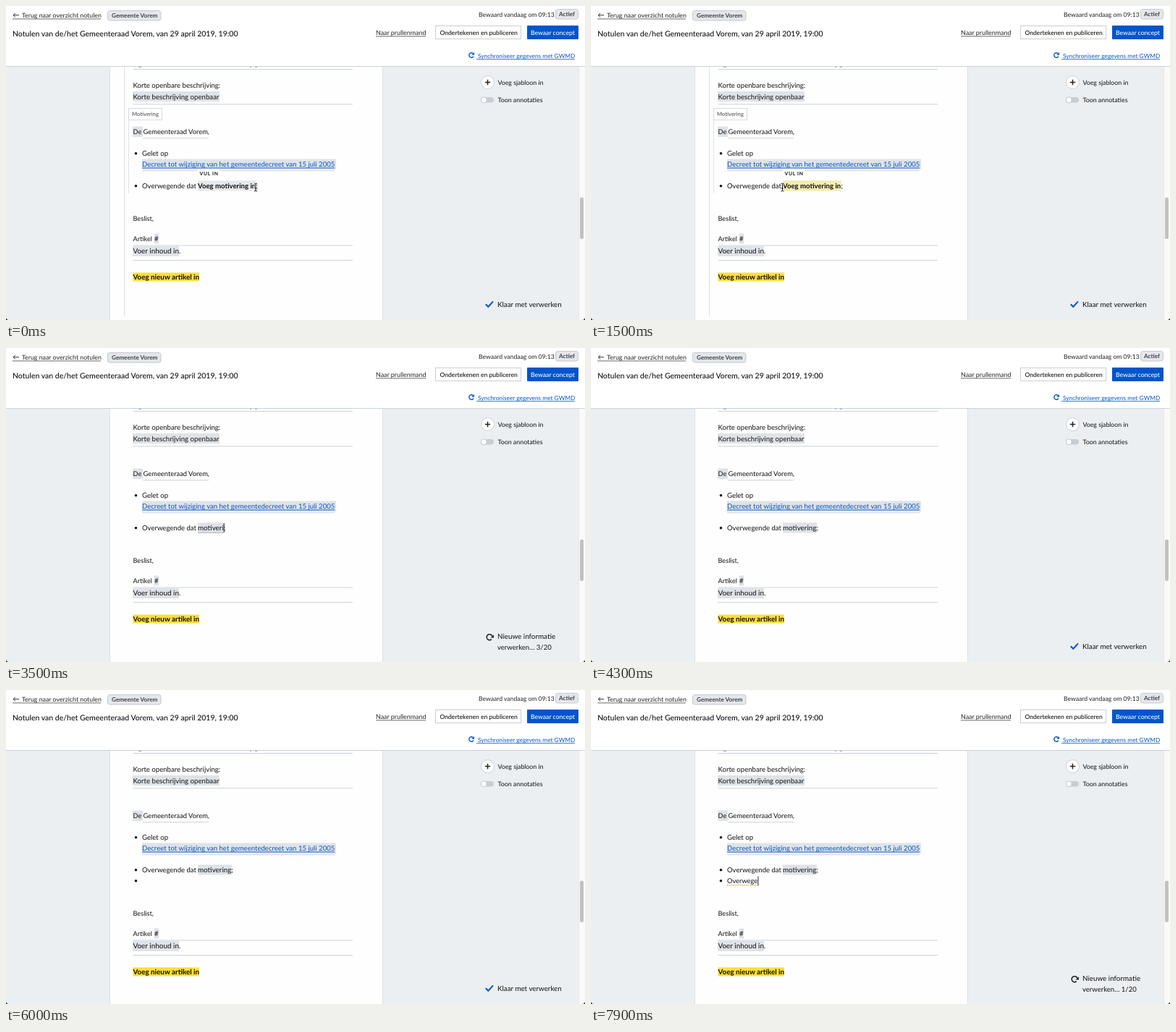
These frames come from a looping animation (800 px wide and 434 px high, 8 s). An HTML page:

```html
<!DOCTYPE html>
<html lang="nl">
<head>
<meta charset="utf-8">
<title>Notulen</title>
<style>
  html, body { margin: 0; width: 100%; height: 100%; overflow: hidden; background: #fff; }
  svg { display: block; width: 800px; height: 434px; fill: #111; }
  text { font-family: Lato, "Open Sans", sans-serif; text-rendering: geometricPrecision; white-space: pre; }
</style>
</head>
<body>
<svg id="stage" viewBox="0 0 800 434" xmlns="http://www.w3.org/2000/svg"></svg>
<script>
const LOOP = 8000;
const BLUE = '#0055cc', GREY = '#dfe3e8', LINE = '#cbd2d9';
const stage = document.getElementById('stage');

function add(parent, tag, attrs, content) {
  const el = document.createElementNS('http://www.w3.org/2000/svg', tag);
  for (const k in attrs) el.setAttribute(k, attrs[k]);
  if (content !== undefined) el.textContent = content;
  parent.appendChild(el);
  return el;
}
const group = parent => add(parent, 'g', {});
const rect = (p, x, y, width, height, fill, more) => add(p, 'rect', { x, y, width, height, fill, ...more });
const path = (p, d, stroke, width, more) =>
  add(p, 'path', { d, stroke, 'stroke-width': width, fill: 'none', ...more });
const label = (p, x, y, size, str, more) => add(p, 'text', { x, y, 'font-size': size, ...more }, str);
const dot = (p, y) => add(p, 'circle', { cx: 179.5, cy: y, r: 1.8 });
const show = (el, on) => el.setAttribute('display', on ? 'inline' : 'none');
const medium = { 'font-weight': 500 }, bold = { 'font-weight': 700 };

// Background and sheet
rect(stage, 0, 84, 800, 350, '#eceff2');
rect(stage, 143, 84, 378, 350, '#dde1e6');
rect(stage, 144, 84, 376, 350, '#fefefe');
rect(stage, 791, 84, 9, 350, '#fafafa');
path(stage, 'M791.5 84V434', '#e6e6e6', 1);
const thumb = rect(stage, 793, 264.5, 5, 57.5, '#c1c1c1', { rx: 2.5 });

// Header
path(stage, 'M0 83.5H800', LINE, 1);
path(stage, 'M18 12.7H10M13 9.9L10 12.7L13 15.5', '#222', 0.9);
label(stage, 22, 16, 8.8, 'Terug naar overzicht notulen', { fill: '#222' });
path(stage, 'M9 17.9H131', '#444', 0.8);
rect(stage, 140.5, 6.5, 73.5, 13.5, '#e4e7eb', { rx: 3, stroke: '#c3cad2' });
label(stage, 146, 16.2, 8.2, 'Gemeente Vorem', { ...bold, fill: '#444' });
label(stage, 9, 42, 10.5, 'Notulen van de/het Gemeenteraad Vorem, van 29 april 2019, 19:00', medium);
label(stage, 653, 15.2, 8.6, 'Bewaard vandaag om 09:13', { fill: '#222' });
rect(stage, 759.5, 4.5, 31, 13.5, '#e4e7eb', { rx: 3, stroke: '#c3cad2' });
label(stage, 764, 14.4, 8.2, 'Actief', { ...bold, fill: '#444' });
label(stage, 511, 40, 8.9, 'Naar prullenmand', { fill: '#222' });
path(stage, 'M511 41.9H580', '#444', 0.8);
rect(stage, 593.5, 27.5, 118, 18, '#fff', { stroke: '#c9ced5' });
label(stage, 599.5, 39.6, 8.55, 'Ondertekenen en publiceren', medium);
rect(stage, 720, 27, 71, 19, BLUE, { rx: 1 });
label(stage, 725, 40, 8.65, 'Bewaar concept', { ...medium, fill: '#fff' });
path(stage, 'M646 69.6A3.3 3.3 0 1 1 645.4 65.6', BLUE, 1.4);
add(stage, 'path', { d: 'M647 64V67.7H643.3Z', fill: BLUE });
label(stage, 652, 71.6, 8.3, 'Synchroniseer gegevens met GWMD', { fill: BLUE });
path(stage, 'M650 73.6H786', BLUE, 0.8);

// Side tools
add(stage, 'circle', { cx: 665.5, cy: 105.5, r: 9, fill: '#fff', stroke: LINE });
path(stage, 'M661.8 105.5H669.2M665.5 101.8V109.2', '#222', 1.5);
label(stage, 679.5, 109, 8.75, 'Voeg sjabloon in');
rect(stage, 656, 126, 18, 7.6, '#c6cdd5', { rx: 3.8 });
add(stage, 'circle', { cx: 660.3, cy: 129.8, r: 4, fill: '#fff', stroke: '#b5bec8', 'stroke-width': 0.8 });
label(stage, 679.5, 133.3, 8.85, 'Toon annotaties');

// Fixed part of the document
const doc = group(stage);
rect(doc, 183, 84, 4, 0.9, '#999');
rect(doc, 337, 84, 2, 0.9, '#999');
rect(doc, 344, 84, 3, 0.9, '#999');
path(doc, 'M175.5 87.5H479M175.5 135.8H479M189 182.7H280M188 227.7H454', LINE, 1);
label(doc, 175.5, 113.2, 9.6, 'Korte openbare beschrijving:');
rect(doc, 175, 118, 120, 14.2, GREY);
label(doc, 175.5, 128.6, 9.66, 'Korte beschrijving openbaar');
rect(doc, 175, 166.5, 14, 14.5, GREY);
label(doc, 175.5, 177.3, 9.2, 'De');
label(doc, 189.5, 177.3, 9.35, 'Gemeenteraad Vorem,');
dot(doc, 203.8);
label(doc, 188, 207.2, 9.65, 'Gelet op');
rect(doc, 188, 211.5, 268, 14.5, GREY);
label(doc, 188, 222.2, 9.58, 'Decreet tot wijziging van het gemeentedecreet van 15 juli 2005', { fill: BLUE });
path(doc, 'M188 223.9H454', BLUE, 0.9);
dot(doc, 248.8);
label(doc, 188, 252.2, 9.55, 'Overwegende dat');

// Part that moves down with a new line
const tail = group(stage);
label(tail, 175.5, 297.4, 9.2, 'Beslist,');
label(tail, 175.5, 325, 9.15, 'Artikel');
rect(tail, 204.5, 314.5, 6.8, 14, GREY);
label(tail, 205, 325, 9.6, '#');
path(tail, 'M175.5 331H479M175.5 351.5H479', LINE, 1);
rect(tail, 175, 332, 64, 14, GREY);
label(tail, 175.5, 342.4, 9.95, 'Voer inhoud in.');
rect(tail, 175.5, 368.5, 91.5, 12, '#fddf37');
label(tail, 175.5, 378, 9.85, 'Voeg nieuw artikel in', bold);

// Section frame and placeholder
const frame = group(stage);
path(frame, 'M163.5 84V429M169.5 157V259', '#dde2e7', 1);
rect(frame, 169.5, 141.5, 46, 16, '#fff', { stroke: '#d5dae0' });
label(frame, 174, 152.3, 7.7, 'Motivering', { fill: '#444' });
const hint = group(stage);
rect(hint, 265, 225.5, 30, 12, '#fff');
label(hint, 267.5, 233.8, 6.8, 'VUL IN', { ...bold, 'letter-spacing': 0.7 });
rect(hint, 265, 241.5, 80.5, 14, '#e6e9ec');
const mark = rect(hint, 265, 241.5, 0, 14, '#f5ecb0');
label(hint, 265, 252.2, 9.6, 'Voeg motivering in', bold);
label(hint, 345.6, 252.2, 9.7, ';');
const mouse = group(hint);
const beam = 'M-2 -5.5Q0 -5.5 0 -4Q0 -5.5 2 -5.5M0 -4V4M-2 5.5Q0 5.5 0 4Q0 5.5 2 5.5M-1.3 1.5H1.3';
path(mouse, beam, '#fff', 2.6);
path(mouse, beam, '#111', 1);

// Typed words
const first = group(stage);
const box = rect(first, 265, 241.5, 0, 14, GREY);
const word = label(first, 265, 252.2, 9.86, '');
const semi = label(first, 265, 252.2, 9.7, ';');
const wave = path(first, '', '#777', 1, { 'stroke-dasharray': '1.2 1.2' });
const second = group(stage);
dot(second, 263.8);
const line = label(second, 188, 267.2, 9.3, '');
const wave2 = path(second, '', '#c9a227', 1.1, { 'stroke-dasharray': '1.4 1.2' });
const caret = rect(stage, 0, 242, 0.9, 13, '#111');

// Status
const ready = group(stage);
path(ready, 'M662.8 412.3L666.3 415.8L673 408.4', BLUE, 2.1);
label(ready, 679, 415.6, 9.8, 'Klaar met verwerken');
const busy = group(stage);
path(busy, 'M670.8 402.7A4 4 0 1 1 672 398.6', '#222', 1.6);
add(busy, 'path', { d: 'M674 396.2V400.4H669.6Z', fill: '#222' });
label(busy, 679, 402.2, 9.83, 'Nieuwe informatie');
const count = label(busy, 679, 417.4, 9.55, '');

// Rounded window corners
add(stage, 'path', { d: 'M0 430Q0 434 4 434H0ZM800 430Q800 434 796 434H800Z' });

const drag = [[0, 345], [150, 345], [700, 271], [850, 264.5], [LOOP, 264.5]];
const cleared = 1700, newLine = 5700;
const typing = [
  { text: 'motivering', start: 2200, step: 178 },
  { text: 'Overwege', start: 6500, step: 190 }
];
const jobs = [
  { from: 2700, to: 4300, step: 250 },
  { from: 7200, to: LOOP, step: 500 }
];

function along(steps, t) {
  const i = steps.findIndex(s => s[0] > t);
  const [t0, a] = steps[i - 1], [t1, b] = steps[i];
  return a + (b - a) * (t - t0) / (t1 - t0);
}
function typed({ text, start, step }, t) {
  return t < start ? '' : text.slice(0, 1 + Math.floor((t - start) / step));
}
function between(t, a, b) { return t >= a && t < b; }

function draw(t) {
  const x = along(drag, t);
  const waiting = t < cleared;
  show(frame, waiting);
  show(hint, waiting);
  mouse.setAttribute('transform', `translate(${x} 250.5)`);
  const left = Math.max(265, x + 1.5);
  mark.setAttribute('x', left);
  mark.setAttribute('width', t > 150 ? Math.max(0, 345.5 - left) : 0);

  show(first, !waiting);
  word.textContent = typed(typing[0], t);
  const w = word.textContent ? word.getComputedTextLength() : 0;
  box.setAttribute('width', w + 0.6);
  semi.setAttribute('x', 265 + w);
  wave.setAttribute('d', `M265 255.3H${265 + w}`);
  show(wave, between(t, 2900, 3800));

  const down = t >= newLine;
  show(second, down);
  line.textContent = typed(typing[1], t);
  const w2 = line.textContent ? line.getComputedTextLength() : 0;
  wave2.setAttribute('d', `M188 269.6H${188 + w2}`);
  show(wave2, t >= 7300);
  tail.setAttribute('transform', `translate(0 ${down ? 15 : 0})`);
  thumb.setAttribute('y', down ? 263.5 : 264.5);

  caret.setAttribute('x', down ? 188 + w2 + 0.3 : 265 + w);
  caret.setAttribute('y', down ? 257.5 : 242);
  const off = between(t, 4000, 4500) || between(t, 5000, newLine) || between(t, 5950, 6450);
  show(caret, !waiting && !off);

  const job = jobs.find(j => between(t, j.from, j.to));
  show(ready, !job);
  show(busy, !!job);
  if (job) count.textContent = `verwerken… ${Math.floor((t - job.from) / job.step)}/20`;
}

const begin = performance.now();
function tick() {
  draw((performance.now() - begin) % LOOP);
  requestAnimationFrame(tick);
}
draw(0);
requestAnimationFrame(tick);
</script>
</body>
</html>
```
